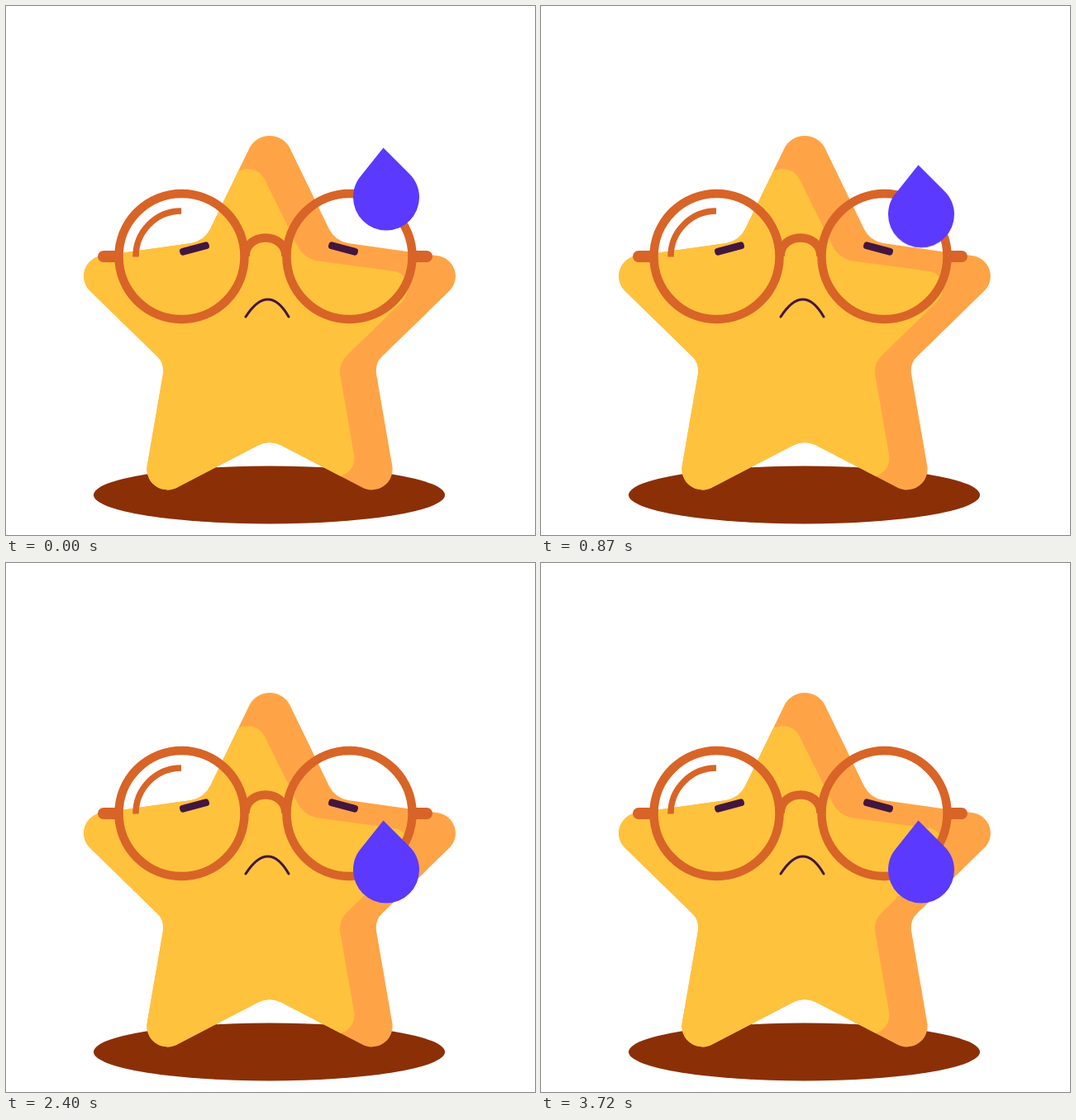
These frames come from a looping animation (640x640 px, 6.33 s). An HTML page without scripts:

```html
<!DOCTYPE html>
<html lang="en">
<head>
<meta charset="utf-8">
<title>Tired star</title>
<style>
  html, body { margin: 0; width: 100%; height: 100%; overflow: hidden; background: #fff; }
  svg { display: block; width: 100%; height: 100%; }

  .glasses, .eyes { animation: nudge 6330ms linear infinite; }
  .glasses { --lift: -12px; fill: none; stroke: #d86427; stroke-width: 10.5; }
  .eyes { --lift: -7px; fill: #43163f; }
  .drop { fill: #5b39ff; animation: slide 6330ms linear infinite; }

  /* two pushes of 570 ms, at 0 and 3150 ms */
  @keyframes nudge {
    0%, 9.0047%, 49.763%, 58.7678%, 100% { transform: translateY(0); }
    4.5024%, 54.2654% { transform: translateY(var(--lift)); }
  }

  /* 660 to 2400 ms, then rest until the loop restarts */
  @keyframes slide {
    0% { transform: translateY(0); }
    10.4265% { transform: translateY(0); animation-timing-function: cubic-bezier(.167, .167, .667, 1); }
    37.9147%, 100% { transform: translateY(140px); }
  }
</style>
</head>
<body>
<svg viewBox="0 0 640 640">
  <defs>
    <path id="star" d="M294.5 172A27.5 27.5 0 0 1 343.5 172L391 270Q398 284 414 287L521 302
      A25 25 0 0 1 535 346L455 424Q446.500 432 448 445L467 555A25 25 0 0 1 430 582
      L332 531Q319 525 306 531L208 582A25 25 0 0 1 171 555L190 445Q191.500 432 183 424
      L103 346A25 25 0 0 1 117 302L224 287Q240 284 247 270Z"/>
    <clipPath id="body"><use href="#star"/></clipPath>
    <rect id="eye" x="-18.25" y="-4.5" width="36.5" height="9" rx="3.7"/>
  </defs>

  <ellipse cx="318.5" cy="591.5" rx="212.5" ry="35" fill="#8b2f06"/>
  <use href="#star" fill="#ffa446"/>
  <path clip-path="url(#body)" fill="#ffc23d" d="M283 199C294 195 307 198 313 210L353 291Q360 304 374 308
    L470 321C485 323 492 343 480 357L412 423Q403 432 404 445L421 543C423 560 412 567 401 570V640H0V199Z"/>

  <path d="M290 376C308 348 326 348 342 376" fill="none" stroke="#43163f" stroke-width="3" stroke-linecap="round"/>

  <g class="eyes">
    <use href="#eye" transform="translate(228 293.5) rotate(-15)"/>
    <use href="#eye" transform="translate(408 293.5) rotate(15)"/>
  </g>

  <g class="glasses">
    <circle cx="212.500" cy="303" r="76"/>
    <circle cx="415.500" cy="303" r="76"/>
    <path d="M289.500 303C289.500 273 338.500 273 338.500 303"/>
    <path d="M118 303H134M494 303H509" stroke-width="14" stroke-linecap="round"/>
    <path d="M157 303.500A55 55 0 0 1 212 248" stroke-width="7.5"/>
  </g>

  <path class="drop" d="M456.500 171.500L488 203C496 211 500 221 500 231.500A40 40 0 0 1 420 231.500
    C420 222 423 213 429 206Z"/>
</svg>
</body>
</html>
```
